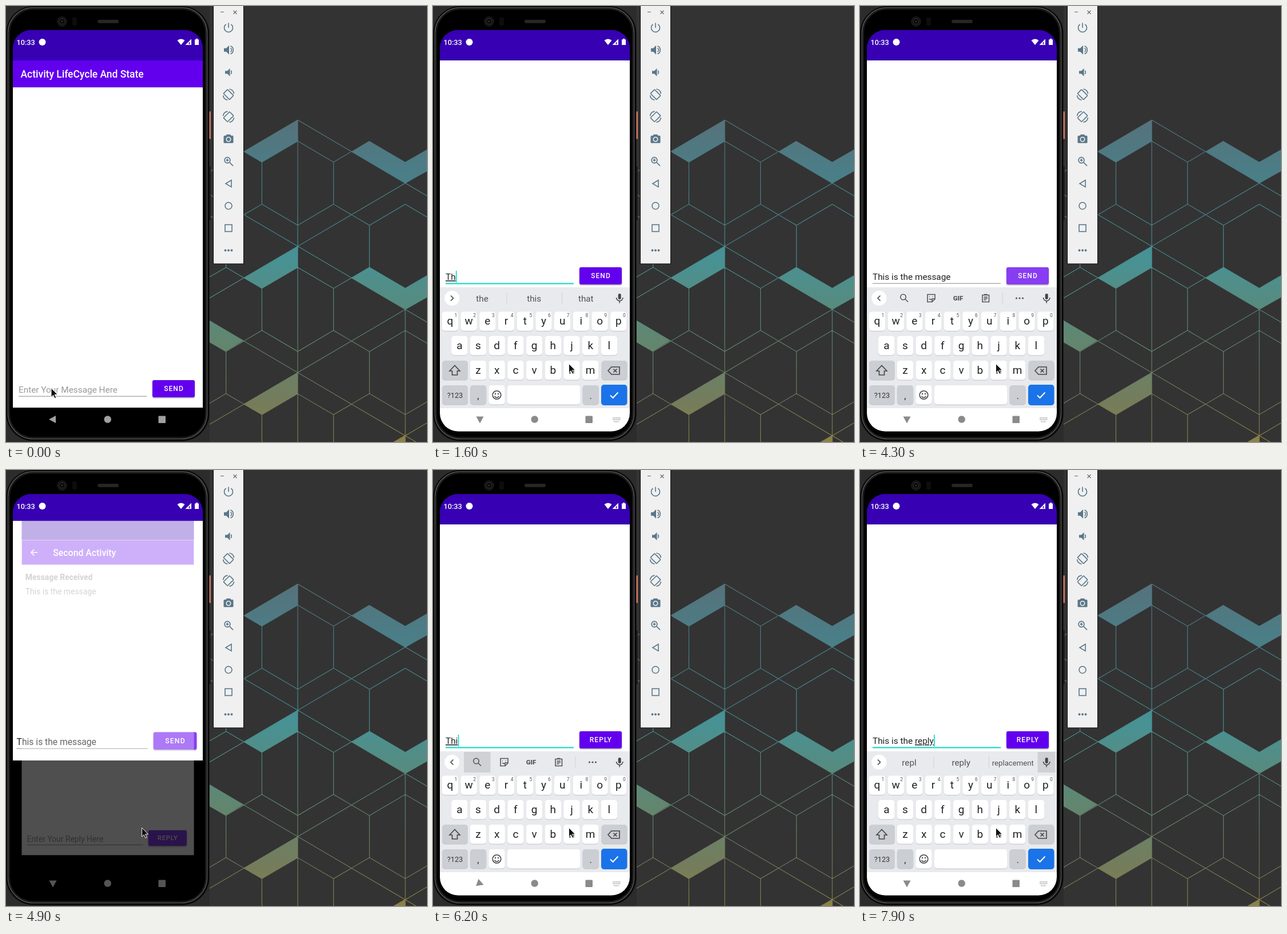
An HTML page for the animation above (8 s loop, 736 by 761 pixels).

```html
<!DOCTYPE html>
<html lang="en">
<head>
<meta charset="utf-8">
<title>Activity life cycle demo</title>
<style>
  html, body { margin: 0; width: 100%; height: 100%; overflow: hidden; background: #333; }
  svg { display: block; width: 736px; height: 761px; font-family: Roboto, sans-serif; }
  text { white-space: pre; }
  .mid { text-anchor: middle; }
  .line { fill: none; stroke-width: 1.6; }
  .title { font-size: 17.45px; font-weight: 500; fill: #fff; }
  .body { font-size: 15.35px; }
  .button { font-size: 12px; font-weight: 500; letter-spacing: 1.06px; fill: #fff; }
  .composing { text-decoration: underline; text-decoration-thickness: 1px; }
</style>
</head>
<body>
<svg id="stage" viewBox="0 0 736 761"></svg>
<script>
const LOOP = 8000, STEP = 100, PAN = 197;

const rect = (x, y, w, h, fill, rx = 0, more = '') =>
  `<rect x="${x}" y="${y}" width="${w}" height="${h}" rx="${rx}" fill="${fill}" ${more}/>`;
const circle = (x, y, r, fill, more = '') => `<circle cx="${x}" cy="${y}" r="${r}" fill="${fill}" ${more}/>`;
const path = (d, more = '') => `<path d="${d}" ${more}/>`;
const text = (x, y, s, more = '') => `<text x="${x}" y="${y}" ${more}>${s}</text>`;
const icon = (x, y, body) => `<g transform="translate(${x} ${y})">${body}</g>`;

// Desktop wallpaper: hexagons hung below a lattice of nodes.
function wallpaper() {
  const dx = 188, dy = 110.2, hx = 62.6, hy = 36.7;
  let lines = '';
  for (let col = -1; col < 3; col++) {
    for (let row = 0; row < 4; row++) {
      const odd = Math.abs(col % 2), x = 510 + col * dx, y = 199 + odd * dy + row * 2 * dy, c = y + dy;
      if (row || !odd) lines += `M${x} ${y}v${2 * dy}`;
      lines += `M${x - dx} ${y + dy}L${x} ${y}l${dx} ${dy}` +
        `M${x} ${c - 2 * hy}l${hx} ${hy}v${2 * hy}l${-hx} ${hy}l${-hx} ${-hy}v${-2 * hy}z`;
      for (const sx of [-1, 1]) for (const sy of [-1, 1])
        lines += `M${x + sx * hx} ${c + sy * hy}l${sx * hx / 2} ${sy * hy / 2}`;
    }
  }
  let tiles = 'M356 549L415 584L384 603L356 587z M677 761L698 749V761z';
  for (let k = 0; k < 3; k++) tiles += `M416 ${254 + k * 220.4}l94-55v37l-63 36.5z`;
  for (let k = 0; k < 2; k++) tiles += `M604 ${254 + k * 220.4}l31-18.4 63 36.7 40-23v38l-40 22z`;
  return `<g clip-path="url(#desk)">${path(lines, 'fill="none" stroke="url(#hue)" stroke-width="1.1"')}
    ${path(tiles, 'fill="url(#hue)"')}</g>`;
}

function emulatorBar() {
  const rotate = flip => `<g transform="scale(${flip} 1)"><rect x="-7.500" y="-5" width="15" height="10" rx="1" transform="rotate(45)"/>
    <path d="M1.500-9.500a9.500 9.500 0 0 1 8 8M-1.500 9.500a9.500 9.500 0 0 1-8-8"/></g>`;
  const speaker = '<path fill="#5a7688" stroke="none" d="M-8-3h4l5-5V8l-5-5h-4z"/><path d="M3.500-3.500a4 4 0 0 1 0 7"/>';
  const icons = [
    '<path d="M0-8.500V0M-4.500-6a7.500 7.500 0 1 0 9 0"/>',
    speaker + '<path d="M3.500-7a7.500 7.500 0 0 1 0 14"/>',
    icon(1, 0, '<path fill="#5a7688" stroke="none" d="M-7-2.500h4l4.500-4.500V7l-4.500-4.500h-4z"/><path d="M3-3a4 4 0 0 1 0 6"/>'),
    rotate(1), rotate(-1),
    rect(-8.5, -6, 17, 13, '#5a7688', 1.5, 'stroke="none"') + rect(-4, -8, 8, 4, '#5a7688', 1, 'stroke="none"') +
      circle(0, 0.5, 3.7, '#5a7688', 'stroke="#f0f0f0"'),
    circle(-2, -2, 5, 'none') + '<path d="M2 2l6 6M-4.500-2h5M-2-4.500v5"/>',
    '<path d="M5-6V6L-5 0z"/>', circle(0, 0, 6, 'none'), rect(-6, -6, 12, 12, 'none'),
    [-5.5, 0, 5.5].map(x => circle(x, 0, 1.9, '#5a7688', 'stroke="none"')).join('')
  ];
  return rect(362, -2, 54, 452.5, '#0c0c0c') + rect(363, -2, 52, 451.5, '#f0f0f0') +
    path('M375 10.500h6M397.500 8l6 6m0-6l-6 6', 'stroke="#666" stroke-width="1.100"') +
    `<g class="line" stroke="#5a7688">${icons.map((body, i) => icon(389, 38 + i * 38.85, body)).join('')}</g>`;
}

const phoneBody = rect(-2, 0, 358, 761, '#2c2c2c') +
  rect(0, 0, 355.5, 759.5, '#0a0a0a', 48) +
  rect(3.5, 3, 348, 752.5, '#060606', 44, 'stroke="#545454" stroke-width="1.500"') +
  rect(6, 5.5, 343, 747.5, '#000', 41, 'stroke="#222" stroke-width="1.500"') +
  rect(355.5, 184, 2.5, 48, '#d8795f') + rect(355.5, 280, 2, 94, '#151515') +
  rect(160, 24, 37, 6, '#262626', 3) + circle(98, 27, 9, '#161616') + circle(98, 27, 4.5, '#080808', 'stroke="#2c2c2c"') +
  circle(98, 27, 1.2, '#444') + rect(116, 20, 8, 14, '#0d0d0d', 2);

const appBar = (x, title) => rect(12, 95, 332, 47, '#6200ee') + text(x, 125, title, 'class="title"');

function activity(id, bar, hint, action) {
  return `<g id="${id}">${rect(12, 42, 332, 53, '#3700b3')}
    <rect id="${id}Page" x="12" y="95" width="332" fill="#fff"/>
    <g clip-path="url(#page)"><g id="${id}Pan">${bar}
      ${text(22, 675, hint, `id="${id}Hint" class="body" fill="#999"`)}
      <text id="${id}Text" class="body" x="22" y="675" fill="#212121"><tspan></tspan><tspan class="composing"></tspan><tspan></tspan></text>
      <rect id="${id}Line" x="22" width="224"/>
      <rect id="${id}Caret" y="659" width="1.600" height="20.500" fill="#03dac5"/>
      <rect id="${id}Button" x="256" y="653" width="74" height="30" rx="3" filter="url(#lift)"/>
      ${text(293.5, 672.3, action, 'class="button mid"')}
    </g></g></g>`;
}

const firstBar = appBar(25.5, 'Activity LifeCycle And State');
const secondBar = appBar(72.5, 'Second Activity') +
  path('M42.500 118.500H30.500M36 112.500l-6 6 6 6', 'class="line" stroke="#fff"') +
  text(19, 172, 'Message Received', 'class="body" font-weight="700" fill="#737373"') +
  text(19, 199, 'This is the message', 'class="body" fill="#757575"');

const statusBar = rect(12, 42, 332, 46.5, '#3700b3') +
  text(18.5, 67.5, '10:33', 'font-size="12.700" font-weight="500" fill="#fff"') + circle(63.5, 63, 6, '#fff') +
  path('M299.500 60q6.500-5 13 0L306 68z M324 57.500V68H313.500z M330 58.500h2v-1.500h3v1.500h2V68h-7z', 'fill="#fff"') +
  path('M320.500 63v4', 'stroke="#3700b3" stroke-width="1.500"');

function keyboard() {
  const key = (x, y, w, fill = '#fff') => rect(x, y + 1, w, 33.5, '#c2c4c8', 5) + rect(x, y, w, 33.5, fill, 5);
  const grey = '#cbced3';
  let out = rect(12, 491, 332, 211.5, '#e8eaed') + rect(12, 702, 332, 41, '#fff');
  [['qwertyuiop', 30, 533.5], ['asdfghjkl', 46.3, 576], ['zxcvbnm', 79, 619]].forEach(([row, x0, y], r) => {
    [...row].forEach((letter, i) => {
      const x = x0 + i * 32.7;
      out += key(x - 14.2, y, 28.4) + text(x, y + 22.8, letter, 'class="mid" font-size="19" fill="#222"');
      if (!r) out += text(x + 10, y + 9.5, (i + 1) % 10, 'class="mid" font-size="8.500" fill="#555"');
    });
  });
  out += key(16, 619, 45, grey) + key(294.5, 619, 45, grey) + key(16, 662, 45, grey) + key(64.8, 662, 28.4, grey) +
    key(97.3, 662, 28.4) + key(130, 662, 127.5) + key(261.5, 662, 28.4, grey) + rect(294, 661, 45.5, 36, '#1a73e8', 5);
  out += text(38.5, 683.5, '?123', 'class="mid" font-size="12.700" fill="#333"') +
    text(79, 686, ',', 'class="mid" font-size="17" fill="#333"') + text(275.7, 686, '.', 'class="mid" font-size="17" fill="#333"');
  out += `<g class="line" stroke="#444">
    ${path('M38 627.500l-9 9.500h4.500v7h9v-7H47z')}
    ${path('M312 630h14v13h-14l-6-6.500zM315.500 633.500l6 6m0-6l-6 6')}
    ${circle(111.5, 679, 7.3, 'none')}${path('M107.500 681q4 5 8 0')}</g>
    ${circle(109, 677, 1.2, '#444')}${circle(114, 677, 1.2, '#444')}
    ${path('M310 679.500l4.500 4.500 9-9.500', 'class="line" stroke="#fff" style="stroke-width:2"')}`;
  // Strip above the keys
  out += `<rect id="glow" y="492" height="36" fill="#cfd1d5"/>` + circle(33.3, 510, 13, '#fff') +
    `<path id="chevron" class="line" stroke="#444"/>` +
    `<g id="tools"><g class="line" stroke="#555">${circle(75.5, 508, 4.7, 'none')}${path('M79 511.500l5 5')}
      ${path('M118 503.500h13v8l-5 5h-8zM126 516v-5h5M121 507.500h1m4.500 0h1M121 511q2 2 4 1')}
      ${path('M214 504.500h11.500v12H214zM217 503.500h5.500M216.500 508h6.500M216.500 510.500h6.500M216.500 513h4')}</g>
      ${text(171.5, 514, 'GIF', 'class="mid" font-size="11.500" font-weight="900" fill="#555"')}
      ${rect(248.5, 500, 1, 19, '#cfd1d5')}${[273.5, 279, 284.5].map(x => circle(x, 510, 1.6, '#555')).join('')}</g>
    <g id="words" fill="#505357">${[86, 176.7, 267.3].map(x => text(x, 515.5, '', 'class="mid"')).join('')}
      ${rect(128.5, 500, 1, 20, '#cfd1d5')}${rect(225, 500, 1, 20, '#cfd1d5')}</g>` +
    rect(323.7, 502, 5, 10, '#444', 2.5) + path('M320.500 509a5.700 5.700 0 0 0 11.400 0M326.200 515v3.500', 'class="line" stroke="#444"');
  return `<g id="keyboard">${out}</g>`;
}

const navBar = `<g id="nav"><path id="back" d="M-7 0L5-6.500V6.500z"/><circle cx="177.700" cy="721.500" r="6.200"/>
  <rect x="266.500" y="715.500" width="12.500" height="12.500" rx="1"/>
  <path id="switcher" d="M314.500 719h13M314.500 722h13M316.500 725.500h9" fill="none" stroke-width="1.700" stroke-dasharray="1.600 1.200"/></g>`;

const stage = document.getElementById('stage');
stage.innerHTML = `<defs>
  <linearGradient id="hue" gradientUnits="userSpaceOnUse" x1="0" x2="0" y1="199" y2="761">
    <stop offset="0" stop-color="#56727b"/><stop offset=".180" stop-color="#4a7f88"/><stop offset=".420" stop-color="#479296"/>
    <stop offset=".680" stop-color="#618670"/><stop offset=".880" stop-color="#757c5b"/><stop offset="1" stop-color="#8c8145"/></linearGradient>
  <clipPath id="desk"><rect x="356" width="380" height="761"/></clipPath>
  <clipPath id="screen"><rect x="12" y="42" width="332" height="700.500" rx="32"/></clipPath>
  <clipPath id="page"><rect x="12" y="95" width="332" height="606"/></clipPath>
  <filter id="lift" x="-20%" y="-30%" width="140%" height="180%"><feDropShadow dx="0" dy="1.300" stdDeviation="1.200" flood-opacity=".350"/></filter>
  </defs>
  ${rect(0, 0, 736, 761, '#333')}${wallpaper()}${phoneBody}
  <g clip-path="url(#screen)">${rect(12, 42, 332, 701, '#000')}
    ${activity('first', firstBar, 'Enter Your Message Here', 'SEND')}
    ${activity('second', secondBar, 'Enter Your Reply Here', 'REPLY')}
    ${statusBar}${keyboard()}${navBar}</g>
  ${emulatorBar()}
  <path id="pointer" d="M0 0V15.500l3.600-3.300 2.600 5.600 2.500-1.100-2.600-5.500h5z" fill="#111" stroke="#fff" stroke-width=".900"/>`;

const el = {};
stage.querySelectorAll('[id]').forEach(node => el[node.id] = node);
const set = (node, attrs) => { for (const name in attrs) node.setAttribute(name, attrs[name]); };
const show = (node, on) => set(node, { visibility: on ? 'visible' : 'hidden' });
const at = (table, t) => table.reduce((row, next) => next[0] <= t ? next : row);

// [time, text with the word being composed between underscores, suggestions]
const firstTyping = [
  [0, ''], [1400, '_T_'], [1600, '_Th_', 'the this that'], [1800, '_Thi_', 'the this that'],
  [2000, '_This_', 'the this that'], [2100, '_This_', 'This these things'],
  [2300, 'This ', 'This these things'], [2400, 'This ', 'is was would'],
  [2900, 'This is _the_ ', 'the there their'], [3100, 'This is the _m_', 'most main message'],
  [3200, 'This is the _me_', 'me message mean'], [3400, 'This is the _mes_', 'me message mean'],
  [3700, 'This is the _mess_', 'mess message messages'], [3900, 'This is the _messa_', 'mess message messages'],
  [4000, 'This is the _message_', 'message messages messaged'], [4200, 'This is the message']
];
const secondTyping = [
  [0, ''], [6200, '_Thi_'], [6300, '_This_', 'This these things'], [6500, 'This ', 'is was would'],
  [6700, 'This _i_', 'I is in'], [6800, 'This _is_', 'is its isn’t'], [6900, 'This is ', 'a the not'],
  [7000, 'This is _t_', 'to the that'], [7100, 'This is _th_', 'the that this'], [7200, 'This is _the_ ', 'the there their'],
  [7400, 'This is the _r_', 'right real reason'], [7500, 'This is the _re_', 're real really'],
  [7600, 'This is the _rep_', 'rep reply report'], [7700, 'This is the _repl_', 'repl reply replace'],
  [7900, 'This is the _reply_', 'repl reply replacement']
];
const keyboardDrop = [[0, 252], [500, 190], [600, 90], [700, 30], [800, 6], [900, 0], [4800, 252], [6000, 70], [6100, 0]];
const firstPan = [[0, 0], [1000, 0.4], [1100, 0.88], [1200, 1]];
const secondPan = [[0, 0], [6000, 0.25], [6100, 0.85], [6200, 1]];
const opening = [ // time, first scale, second scale, second opacity
  [0, 1, 1, 0], [4800, 1.008, 0.87, 0.06], [4900, 1.022, 0.907, 0.31], [5000, 1.036, 0.965, 0.9], [5100, 1.045, 0.989, 1], [5200, 1, 1, 1]];
const pointerPath = [[0, 79, 667], [300, 92, 664], [400, 125, 655], [500, 165, 644], [600, 205, 633], [700, 230, 626], [800, 237.5, 624.5]];
const backTurn = [[0, 0], [700, -45], [800, -90], [5000, 0], [6100, -60], [6200, -160], [6300, -90]];
const navTone = [[0, '#a0a0a0'], [700, '#ddd'], [1000, '#bbb'], [1100, '#999'], [1200, '#8a8a8a'],
  [4800, '#555'], [5000, '#888'], [5100, '#a0a0a0'], [6000, '#ccc'], [6100, '#aaa'], [6200, '#8a8a8a']];

function drawActivity(id, value, { pan, editing, actionFocus }) {
  const part = name => el[id + name];
  set(part('Pan'), { transform: `translate(0 ${-PAN * pan})` });
  value.split('_').concat('', '').slice(0, 3).forEach((s, i) => part('Text').children[i].textContent = s);
  show(part('Hint'), !value);
  show(part('Caret'), editing);
  set(part('Caret'), { x: 22.3 + part('Text').getComputedTextLength() });
  set(part('Line'), editing ? { y: 680.5, height: 2, fill: '#03dac5' } : { y: 680.7, height: 1, fill: '#8c8c8c' });
  set(part('Button'), { fill: actionFocus ? '#883df2' : '#6200ee' });
}

function render(t) {
  const [, value1, words1] = at(firstTyping, t), [, value2, words2] = at(secondTyping, t);
  const [, scale1, scale2, opacity] = at(opening, t);
  const moving = t >= 4800 && t < 5200;
  const zoom = s => `translate(178 392) scale(${s}) translate(-178 -392)`;

  drawActivity('first', value1, { pan: at(firstPan, t)[1], editing: t >= 200 && t < 4200, actionFocus: t >= 4200 });
  drawActivity('second', value2, { pan: at(secondPan, t)[1], editing: t >= 5500, actionFocus: t < 5600 });
  set(el.first, { transform: zoom(scale1) });
  set(el.firstPage, { height: moving ? 409.5 : 606 });
  set(el.secondPage, { height: 606 });
  set(el.second, { transform: zoom(scale2), opacity });
  show(el.first, t < 5200);

  const drop = at(keyboardDrop, t)[1], typing = drop < 150;
  set(el.keyboard, { transform: `translate(0 ${drop})` });
  const words = t < 4800 ? words1 : words2;
  el.tools.style.display = words ? 'none' : '';
  el.words.style.display = words ? '' : 'none';
  set(el.chevron, { d: words ? 'M31 505.500l4.500 4.500-4.500 4.500' : 'M35.500 505.500l-4.500 4.500 4.500 4.500' });
  if (words) words.split(' ').forEach((word, i) => {
    el.words.children[i].textContent = word;
    set(el.words.children[i], { 'font-size': word.length > 9 ? 13.2 : 15.2 });
  });
  set(el.glow, words ? { x: 310.5, width: 31 } : { x: 54, width: 46.5 });
  el.glow.style.display = t >= 6100 ? '' : 'none';

  const tone = at(navTone, t)[1];
  set(el.nav, { fill: tone });
  set(el.switcher, { stroke: tone });
  el.switcher.style.display = typing ? '' : 'none';
  set(el.back, { transform: `translate(82 721.500) rotate(${at(backTurn, t)[1]})` });
  const [, px, py] = at(pointerPath, t);
  set(el.pointer, { transform: `translate(${px} ${py})` });
}

const start = performance.now();
let shown = -1;
function tick(now) {
  const t = Math.floor(Math.max(0, now - start) % LOOP / STEP) * STEP;
  if (t !== shown) render(shown = t);
  requestAnimationFrame(tick);
}
render(0);
requestAnimationFrame(tick);
</script>
</body>
</html>
```
